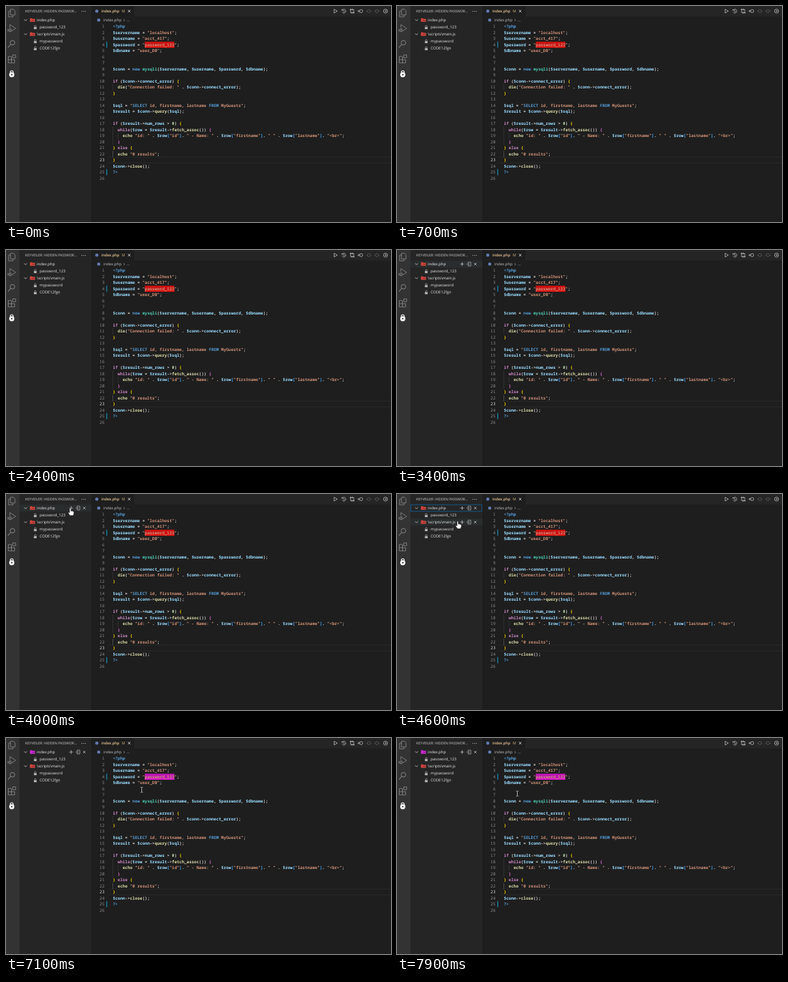
Recreate the animation shown at these times as an HTML page with a canvas. Size 600 px wide and 338 px high, loop 8 s.

```html
<!DOCTYPE html>
<html lang="en">
<head>
<meta charset="utf-8">
<title>Editor highlight colour</title>
<style>
html, body { margin: 0; width: 100%; height: 100%; overflow: hidden; background: #1e1e1e; }
canvas { display: block; width: 600px; height: 338px; }
</style>
</head>
<body>
<canvas id="stage"></canvas>
<script>
const W = 600, H = 338, LOOP = 8000, STEP = 100;
const HOVER = 3300, FOCUS = 4100, OPEN = 4900, PICK = 6200;
const UI = '"Open Sans", "Noto Sans", sans-serif';
const MONO = '"Noto Sans Mono", "DejaVu Sans Mono", monospace';
const CODE_X = 166.4, CODE_Y = 32, CHAR = 3.84, LINE = 9.5;

const canvas = document.getElementById('stage');
const ctx = canvas.getContext('2d');
const dpr = window.devicePixelRatio || 1;
canvas.width = W * dpr;
canvas.height = H * dpr;

const code = `<?php
$servername = "localhost";
$username = "acct_417";
$password = "password_123";
$dbname = "user_DB";


$conn = new mysqli($servername, $username, $password, $dbname);

if ($conn->connect_error) {
  die("Connection failed: " . $conn->connect_error);
}

$sql = "SELECT id, firstname, lastname FROM MyGuests";
$result = $conn->query($sql);

if ($result->num_rows > 0) {
  while($row = $result->fetch_assoc()) {
    echo "id: " . $row["id"]. " - Name: " . $row["firstname"]. " " . $row["lastname"]. "<br>";
  }
} else {
  echo "0 results";
}
$conn->close();
?>
`.split('\n');

const colors = ['Red', 'Green', 'Blue', 'Yellow', 'Pink', 'Cyan'];
const RED = { fill: '#cc1010', line: '#ff1a1a', folder: '#cf463e' };
const PINK = { fill: '#bd14b4', line: '#ff1cf0', folder: '#cc2ad2' };

// ---------- drawing helpers ----------
function rect(x, y, w, h, fill) {
  ctx.fillStyle = fill;
  ctx.fillRect(x, y, w, h);
}

function text(str, x, mid, size, fill, font = UI, weight = 500) {
  ctx.font = `${weight} ${size}px ${font}`;
  ctx.fillStyle = fill;
  ctx.fillText(str, x, mid + size * 0.36);
}

function stroke(path, x, y, color, width = 0.8) {
  ctx.save();
  ctx.translate(x, y);
  ctx.strokeStyle = color;
  ctx.lineWidth = width;
  ctx.stroke(new Path2D(path));
  ctx.restore();
}

function fillPath(path, x, y, color) {
  ctx.save();
  ctx.translate(x, y);
  ctx.fillStyle = color;
  ctx.fill(new Path2D(path));
  ctx.restore();
}

function dot(x, y, r, color) {
  ctx.beginPath();
  ctx.arc(x, y, r, 0, Math.PI * 2);
  ctx.fillStyle = color;
  ctx.fill();
}

const ring = r => `M${r} 0A${r} ${r} 0 1 1 ${-r} 0A${r} ${r} 0 1 1 ${r} 0`;
const CROSS = 'M-2 -2L2 2M2 -2L-2 2';

// ---------- syntax colouring ----------
function tokenize(lines) {
  const rule = /"[^"]*"|<\?php|\?>|\$\w+|->\w+|\w+|[()[\]{}]|\s+|[^\w\s]/g;
  const brackets = ['#ffd700', '#da70d6', '#4aa8ff'];
  let depth = 0;
  const paint = (s, rest) => {
    if (/^[[{]/.test(s)) return brackets[depth++ % 3];
    if (/^[\]}]/.test(s)) return brackets[--depth % 3];
    if (/^(<\?php|\?>|new)$/.test(s)) return '#569cd6';
    if (/^\$/.test(s)) return '#9cdcfe';
    if (/^(if|else|while)$/.test(s)) return '#c586c0';
    if (/^(die|echo)$/.test(s)) return '#dcdcaa';
    if (s === 'mysqli') return '#4ec9b0';
    if (/^\d+$/.test(s)) return '#b5cea8';
    if (/^\w/.test(s)) return rest[0] === '(' ? '#dcdcaa' : '#9cdcfe';
    return '#d4d4d4';
  };
  return lines.map(line => {
    const out = [];
    for (const m of line.matchAll(rule)) {
      const s = m[0], col = m.index;
      const rest = line.slice(col + s.length);
      if (!s.trim()) continue;
      if (s[0] === '"') {
        for (const p of s.matchAll(/SELECT|FROM|(?:(?!SELECT|FROM).)+/g)) {
          const key = /^(SELECT|FROM)$/.test(p[0]);
          out.push([p[0], col + p.index, key ? '#569cd6' : '#ce9178']);
        }
      } else if (s.startsWith('->')) {
        out.push(['->', col, '#d4d4d4']);
        out.push([s.slice(2), col + 2, paint(s.slice(2), rest)]);
      } else {
        out.push([s, col, paint(s, rest)]);
      }
    }
    return out;
  });
}
const tokens = tokenize(code);
const lineMid = n => CODE_Y + (n - 1) * LINE;

// ---------- parts ----------
function activityBar() {
  rect(0, 0, 21, H, '#333333');
  const c = '#8a8a8a';
  stroke('M-2 -6H2.500L5 -3.500V3H-2ZM-2 -3H-5V6H2V3', 9, 11, c, 0.9);
  stroke('M-3 -1V-6L6 0L0 4', 9, 35, c, 0.9);
  stroke(ring(2.3) + 'M-2.200 -1H-4.500M-2.200 1H-4.500M0 -2.300V2.300', 6.5, 38, c, 0.8);
  stroke(ring(3.6), 10, 57.5, c, 1);
  stroke('M0 0L-4.500 5', 7.5, 60, c, 1.1);
  stroke('M-5 -3H0V7H-5ZM-5 2H5V7H0M2 -5.500H6.500V-1H2Z', 8.5, 82, c, 0.9);
  dot(9, 107.5, 4, '#ffffff');
  stroke('M-2.300 0V-1.500A2.300 2.300 0 0 1 2.300 -1.500V0', 9, 105, '#ffffff', 1.1);
  rect(7.8, 106.6, 2.4, 1.8, '#333333');
}

function rowActions(mid) {
  const c = '#c5c5c5';
  stroke('M-3 0H3M0 -3V3', 101.5, mid, c);
  stroke('M-1 -1.500V-3H3.300V3H-1V1.500M-3.500 0H1M-0.500 -1.500L1 0L-0.500 1.500', 111.7, mid, c, 0.7);
  stroke(CROSS, 122, mid, c);
}

function folderRow(label, mid, color) {
  stroke('M-2.200 -1.200L0 1.200L2.200 -1.200', 30.5, mid, '#d0d0d0');
  fillPath('M-4 -2.700H-0.700L0.200 -2H4V2.700H-4Z', 41.3, mid, color);
  rect(40.5, mid - 0.6, 4, 1.8, 'rgba(30,30,30,0.3)');
  text(label, 48, mid, 6.05, '#ececec');
}

function lockRow(label, mid) {
  rect(43.5, mid - 0.3, 4.2, 3.2, '#b5b5b5');
  stroke('M-1.200 0V-1.300A1.200 1.200 0 0 1 1.200 -1.300V0', 45.6, mid - 0.3, '#b5b5b5', 0.7);
  text(label, 52.3, mid, 6.05, '#e6e6e6');
}

function sideBar(t, cur, mark) {
  rect(21, 0, 112, H, '#252526');
  text('KEYVEILER: HIDDEN PASSWOR...', 30, 8, 5.45, '#cfcfcf');
  for (let i = -1; i < 2; i++) dot(121 + i * 2.7, 8.3, 0.65, '#d0d0d0');

  const active = t >= HOVER;
  const second = cur && cur.x < 133 && cur.y > 38.5 && cur.y < 49.5 && t < OPEN;
  if (active && t < FOCUS) rect(21, 16.5, 112, 11, '#2a2d2e');
  if (second) rect(21, 38.5, 112, 11, '#2a2d2e');
  if (t >= FOCUS && t < OPEN) {
    ctx.strokeStyle = '#0a70b4';
    ctx.lineWidth = 0.7;
    ctx.strokeRect(21.4, 16.9, 110.8, 10.2);
  }
  folderRow('index.php', 22, mark.folder);
  lockRow('password_123', 33.3);
  folderRow('\\scripts\\main.js', 44, RED.folder);
  lockRow('mypassword', 55.3);
  lockRow('CODE12fgn', 66.3);
  if (active) rowActions(22);
  if (second) rowActions(44);
}

function tabBar() {
  rect(133, 0, W - 133, 16.5, '#252526');
  rect(133, 0, 67, 16.5, '#1e1e1e');
  dot(141.5, 8, 2.5, '#6279ad');
  text('index.php', 148.5, 8.2, 5.9, '#e8c896', UI, 600);
  text('M', 180.3, 8.2, 5.9, '#c9a878');
  stroke(CROSS, 192, 8, '#e8e8e8');

  dot(144.5, 22, 2.5, '#6279ad');
  text('index.php', 151.8, 22, 6.05, '#c4c4c4');
  stroke('M-0.900 -1.800L0.900 0L-0.900 1.800', 184, 22.2, '#b5b5b5', 0.7);
  text('...', 188, 22, 6.05, '#c4c4c4');

  const c = '#c5c5c5', dim = '#5c5c5c', y = 8;
  stroke('M-2.200 -3L2.800 0L-2.200 3Z', 513.5, y, c);
  stroke('M-2.600 -1.500A3 3 0 1 1 -2.600 1.500M-3 -3V-1H-1M0 -1.500V0.500L1.500 1.300', 526.5, y, c);
  stroke('M-2.500 -1.500V2.500H0.700M2.500 1.500V-2.500H-0.700M0.600 -4L-0.900 -2.500L0.600 -1M-0.600 1L0.900 2.500L-0.600 4', 539.5, y, c);
  dot(537, 5.5, 1.1, c);
  dot(542, 10.5, 1.1, c);
  stroke(ring(2.4) + 'M-2.400 0H-5M-3.300 -1.800L-5 0L-3.300 1.800', 553.5, y, c);
  stroke(ring(2.4) + 'M-2.400 0H-4M2.400 0H4', 565.5, y, dim);
  stroke(ring(2.4) + 'M2.400 0H4.500M-2.400 0H-4', 578, y, dim);
  stroke(ring(3.2), 591.5, y, c);
  stroke('M-1.500 0H1.500M0 -1.500L1.500 0L0 1.500', 591.5, y, c);
}

function guide(col, first, last, color) {
  rect(CODE_X + col * CHAR, lineMid(first) - LINE / 2, 0.6, (last - first + 1) * LINE, color);
}

function editor(mark) {
  rect(133, 16, W - 133, H - 16, '#1e1e1e');
  const top = lineMid(23) - LINE / 2;
  rect(159, top, W - 159, 0.8, '#2c2c2c');
  rect(159, top + LINE - 0.8, W - 159, 0.8, '#2c2c2c');
  for (const n of [4, 25]) rect(156.3, lineMid(n) - LINE / 2, 1.4, LINE, '#1b81a8');

  guide(0, 11, 11, '#404040');
  guide(0, 18, 20, '#404040');
  guide(2, 19, 19, '#404040');
  guide(0, 22, 22, '#707070');

  const left = CODE_X + 13 * CHAR, wide = 12 * CHAR, mid4 = lineMid(4);
  rect(left, mid4 - 4.7, wide, 9.4, mark.fill);
  rect(left, mid4 + 3.3, wide, 1.3, mark.line);

  tokens.forEach((list, i) => {
    const mid = lineMid(i + 1);
    ctx.textAlign = 'right';
    text(String(i + 1), 153.5, mid, 6.4, i === 22 ? '#d0d0d0' : '#8c8c8c', MONO);
    ctx.textAlign = 'left';
    for (const [s, col, color] of list) {
      text(s, CODE_X + col * CHAR, mid, 6.4, color, MONO, 600);
    }
  });
}

function picker(cur) {
  ctx.save();
  ctx.shadowColor = 'rgba(0,0,0,0.5)';
  ctx.shadowBlur = 4 * dpr;
  rect(163, 0, 300, 85, '#252526');
  ctx.restore();
  rect(168, 2.3, 292, 12.7, '#3c3c3c');
  ctx.strokeStyle = '#007fd4';
  ctx.lineWidth = 0.8;
  ctx.strokeRect(168.4, 2.5, 291.2, 12.4);
  rect(169.6, 5, 0.7, 8, '#d4d4d4');
  colors.forEach((name, i) => {
    const mid = 23 + i * 11;
    const over = cur.x > 163 && Math.abs(cur.y - mid) < 5.5;
    if (i === 0) rect(163, mid - 5.5, 300, 11, '#04395e');
    else if (over) rect(163, mid - 5.5, 300, 11, '#2a2d2e');
    text(name, 169, mid, 6.05, i ? '#dcdcdc' : '#ffffff', UI, i ? 500 : 600);
  });
}

// ---------- pointer ----------
const path = [
  [3700, 100, 22], [4200, 100, 22], [4600, 94.5, 42.5], [5000, 96, 44],
  [5800, 197, 64], [6000, 197.5, 65.5], [6300, 198, 68],
  [7100, 211.5, 81], [7900, 187.5, 87], [8000, 187.5, 87]
];

function pointer(t) {
  if (t < path[0][0]) return null;
  const i = path.findIndex(p => p[0] > t);
  const [t0, x0, y0] = path[i - 1], [t1, x1, y1] = path[i];
  const k = (t - t0) / (t1 - t0), e = k * k * (3 - 2 * k);
  return { x: x0 + (x1 - x0) * e, y: y0 + (y1 - y0) * e, beam: t >= PICK };
}

function drawPointer({ x, y, beam }) {
  if (beam) {
    const bar = 'M-2 -4H-0.500L0 -3.500L0.500 -4H2M0 -3.500V3.500M-2 4H-0.500L0 3.500L0.500 4H2';
    stroke(bar, x, y, '#111111', 1.6);
    stroke(bar, x, y, '#e0e0e0', 0.8);
    return;
  }
  const hand = 'M-1 0.700Q0 -0.600 1 0.700V4.200Q2 3.500 2.700 4.500Q3.800 4 4.300 5Q5.700 4.700 5.800 6V8.500L4.800 11.700H-0.400L-3 7.700Q-3.200 6.300 -1.800 6.700L-1 7.500Z';
  fillPath(hand, x, y, '#ffffff');
  stroke(hand, x, y, '#111111', 0.6);
  stroke('M1 4.200V6.200M2.700 4.500V6.300M4.300 5V6.500', x, y, '#444444', 0.4);
}

// ---------- loop ----------
function draw(t) {
  ctx.setTransform(dpr, 0, 0, dpr, 0, 0);
  ctx.textRendering = 'geometricPrecision';
  ctx.textAlign = 'left';
  const cur = pointer(t);
  const mark = t >= PICK ? PINK : RED;
  editor(mark);
  tabBar();
  sideBar(t, cur, mark);
  activityBar();
  if (t >= OPEN && t < PICK) picker(cur);
  if (cur) drawPointer(cur);
}

function frame() {
  const t = performance.now() % LOOP;
  draw(Math.floor(t / STEP) * STEP);
  requestAnimationFrame(frame);
}
frame();
</script>
</body>
</html>
```
